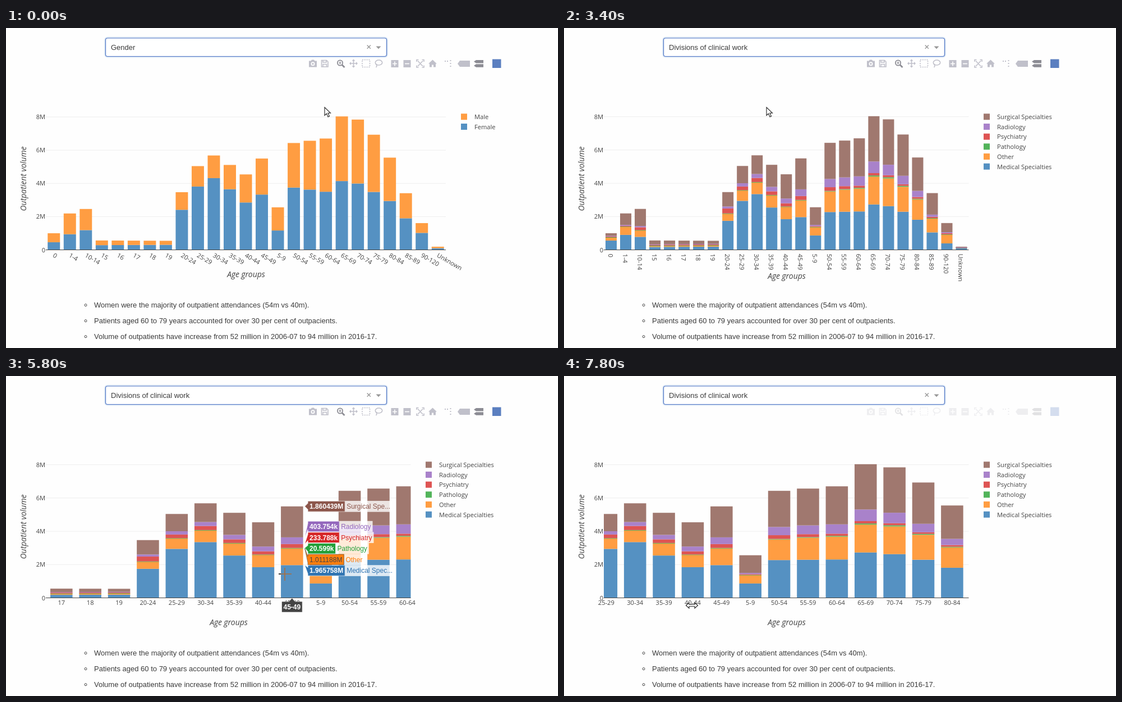
These frames come from a looping animation (984x569 px, 8 s). An HTML page:

```html
<!DOCTYPE html>
<html lang="en">
<head>
<meta charset="utf-8">
<title>Outpatient volume</title>
<style>
html, body { margin: 0; width: 100%; height: 100%; overflow: hidden; background: #fefefe; }
svg { display: block; width: 100%; height: 100%; }
text { font: 13px "Liberation Sans", Arial, sans-serif; fill: #3b3b3b; white-space: pre; }
.plot { font: 11.1px "Open Sans", sans-serif; fill: #444; }
.title { font: italic 14px "Open Sans", sans-serif; fill: #444; }
.tip { font-size: 12px; }
.bold { font-weight: bold; }
.end { text-anchor: end; }
.mid { text-anchor: middle; }
.cross { mix-blend-mode: difference; }
</style>
</head>
<body>
<svg id="stage" viewBox="0 0 984 569"></svg>
<script>
const stage = document.getElementById('stage');
const LOOP = 8000, STEP = 200, ZERO = 394.5, LEFT = 71, TOP = 144, BAR = 0.77, ZOOM_STEP = 51.38;

// Linear interpolation between key points [position, value, ...]
function at(keys, t) {
  const n = keys.findIndex(k => k[0] > t);
  if (n === 0) return keys[0].slice(1);
  if (n < 0) return keys[keys.length - 1].slice(1);
  const a = keys[n - 1], b = keys[n], p = (t - a[0]) / (b[0] - a[0]);
  return a.slice(1).map((v, i) => v + (b[i + 1] - v) * p);
}

const span = (from, to, width) => Array.from({ length: (to - from) / width + 1 },
  (_, i) => width === 1 ? `${from + i}` : `${from + i * width}-${from + i * width + width - 1}`);
const ages = ['0', '1-4', '10-14', ...span(15, 19, 1), ...span(20, 45, 5), '5-9', ...span(50, 85, 5), '90-120', 'Unknown'];

function midAge(label) {
  if (label === 'Unknown') return 120;
  const ends = label.split('-').map(Number);
  return (ends[0] + ends[ends.length - 1]) / 2;
}

// Volume in thousands along age; single years hold a fifth of a normal group
const volume = [[0, 1000], [2.5, 2190], [7, 2560], [12, 2460], [15, 565], [19, 545], [22, 3470], [27, 5040],
  [32, 5680], [42, 4540], [47, 5495], [52, 6430], [62, 6700], [67, 8030], [72, 7840], [77, 6930], [82, 5550],
  [87, 3410], [105, 1610], [120, 190]];

// Each trace takes a share of the volume along age; the last one takes what is left
const trace = (name, fill, strong, share) => ({ name, fill, strong, share });
function makeChart(layout, traces) {
  const stacks = ages.map(label => {
    const age = midAge(label), sum = at(volume, age)[0];
    let left = sum;
    return traces.map(({ share }) => {
      const part = share ? sum * at(share, age)[0] : left;
      left -= part;
      return part;
    });
  });
  return { ...layout, traces, stacks };
}

const BLUE = '#5591c2', ORANGE = '#ff9d42';
const gender = makeChart({ right: 784, scale: 0.02955, legendX: 811, textX: 835, titleX: 428 }, [
  trace('Female', BLUE, BLUE, [[0, .46], [2.5, .43], [15, .5], [19, .56], [22, .695], [27, .756], [32, .76],
    [37, .714], [42, .628], [52, .583], [62, .522], [77, .503], [87, .557], [105, .634], [120, .53]]),
  trace('Male', ORANGE, ORANGE)
]);
const divisions = makeChart({ right: 721.5, scale: 0.0296, legendX: 748, textX: 772, titleX: 397 }, [
  trace('Medical Specialties', BLUE, '#2f74b2', [[0, .56], [2.5, .411], [7, .338], [15, .305], [19, .352], [22, .503],
    [27, .584], [32, .59], [42, .406], [47, .358], [82, .326], [105, .242], [120, .63]]),
  trace('Other', ORANGE, '#ff7f0e', [[0, .2], [2.5, .233], [15, .143], [19, .166], [22, .127], [32, .125],
    [47, .184], [57, .201], [82, .22], [105, .335], [120, .08]]),
  trace('Pathology', '#52b45a', '#23a03a', [[0, .001], [22, .0015], [47, .0037], [70, .009], [105, .004]]),
  trace('Psychiatry', '#de5453', '#d62728', [[0, .05], [2.5, .011], [7, .018], [16, .108], [19, .108], [27, .043],
    [47, .0425], [62, .0194], [77, .014], [105, .04]]),
  trace('Radiology', '#a982ca', '#9467bd', [[0, .024], [32, .042], [47, .0735], [67, .087], [82, .0667], [87, .038]]),
  trace('Surgical Specialties', '#a0786f', '#8c564b')
]);

// Exact readings for the groups the pointer rests on, bottom trace first
const readings = {
  '16': '175.92k 82.164k 435 61.04k 13.883k 230.504k',
  '45-49': '1.965758M 1.011188M 20.599k 233.788k 403.754k 1.860439M'
};
const short = v => v >= 1000 ? (v / 1000).toFixed(3) + 'M' : v >= 1 ? v.toFixed(2) + 'k' : Math.round(v * 1000);

const pointer = [[0, 568, 141], [400, 556, 115], [1200, 462, 36], [2000, 430, 32], [2600, 404, 91], [3200, 397, 102],
  [3600, 325, 180], [4200, 199, 313], [4400, 225, 312], [4800, 463, 312], [5000, 552, 312], [5800, 497, 352],
  [6400, 446, 399], [7000, 337, 399], [7600, 228, 408]];
const modebarFade = [[800, 1], [1200, 0], [2800, 0], [3000, 1], [4000, 1], [4400, 0], [5000, 0], [5400, 1],
  [6400, 1], [6800, 0], [7600, 0], [8400, 1]];
const pan = [[6400, 0], [7000, -98], [7600, -229]];

const rect = (x, y, w, h, fill, extra = '') =>
  `<rect x="${x}" y="${y}" width="${w}" height="${h}" fill="${fill}" ${extra}/>`;
const path = (d, fill, stroke = 'none', width = 1) =>
  `<path d="${d}" fill="${fill}" stroke="${stroke}" stroke-width="${width}"/>`;
const text = (x, y, s, cls = '', extra = '') => `<text x="${x}" y="${y}" class="${cls}" ${extra}>${s}</text>`;

const ruler = document.createElement('canvas').getContext('2d');
function widthOf(s, weight = '') {
  ruler.font = weight + ' 12px "Liberation Sans", Arial, sans-serif';
  return ruler.measureText(s).width;
}

function axis(chart, t) {
  if (t >= 5200) return { first: 98.8 - 5 * ZOOM_STEP + at(pan, t)[0], step: ZOOM_STEP, angle: 0 };
  const step = (chart.right - LEFT) / ages.length;
  return { first: LEFT + step / 2, step, angle: chart === gender ? 30 : 90 };
}

function drawTick(cx, label, angle) {
  if (!angle) return text(cx, 407, label, 'plot mid');
  const x = cx - angle / 60, y = angle === 90 ? 401.5 : 403;
  return text(x, y + 4, label, 'plot', `transform="rotate(${angle} ${x} ${y})"`);
}

function drawChart(chart, ax) {
  const { right, scale } = chart, width = right - LEFT, barWidth = ax.step * BAR;
  let grid = '', bars = '', ticks = '';
  for (let m = 0; m <= 8; m += 2) {
    const y = ZERO - m * 1000 * scale;
    if (m) grid += rect(LEFT, y - .5, width, 1, '#eee');
    ticks += text(70, y + 4, m ? m + 'M' : 0, 'plot end');
  }
  ages.forEach((age, i) => {
    const cx = ax.first + i * ax.step;
    let y = ZERO;
    chart.traces.forEach(({ fill }, n) => {
      const h = chart.stacks[i][n] * scale;
      y -= h;
      bars += rect(cx - barWidth / 2, y, barWidth, Math.max(h, 1), fill);
    });
    if (cx >= LEFT && cx <= right) ticks += drawTick(cx, age, ax.angle);
  });
  const legend = [...chart.traces].reverse().map(({ name, fill }, i) =>
    rect(chart.legendX, 152.3 + i * 17.7, 11, 11, fill) +
    text(chart.textX, 162 + i * 17.7, name, 'plot')).join('');
  return grid + `<clipPath id="area">${rect(LEFT, TOP, width, 251, '#000')}</clipPath>` +
    `<g clip-path="url(#area)">${bars}</g>` + rect(LEFT, 394, width, 1, '#444') + ticks + legend +
    text(chart.titleX, ax.angle === 90 ? 446 : 443.3, 'Age groups', 'title mid') +
    text(0, 0, 'Outpatient volume', 'title mid', 'transform="translate(36 268) rotate(-90)"');
}

// Moves labels apart by the least amount, keeping them above the axis
function spread(positions, gap) {
  const blocks = [];
  positions.forEach((p, i) => {
    let block = { sum: p - i * gap, count: 1 };
    while (blocks.length) {
      const last = blocks[blocks.length - 1];
      if (last.sum / last.count <= block.sum / block.count) break;
      blocks.pop();
      block = { sum: last.sum + block.sum, count: last.count + block.count };
    }
    blocks.push(block);
  });
  return blocks.flatMap(b => Array(b.count).fill(b.sum / b.count))
    .map((base, i) => Math.min(base + i * gap, 385 - (positions.length - 1 - i) * gap));
}

function drawHover({ traces, stacks, scale }, ax, i) {
  const cx = ax.first + i * ax.step, tipX = cx + ax.step * BAR / 2 + 3, x = tipX + 5.5;
  const values = readings[ages[i]] ? readings[ages[i]].split(' ') : stacks[i].map(short);
  let y = ZERO;
  const tops = stacks[i].map(v => y -= v * scale).reverse();
  const centres = spread(tops, 19.6);
  let out = '';
  traces.forEach((tr, n) => {
    const row = traces.length - 1 - n, c = centres[row], dark = tr.name === 'Other', value = values[n];
    const name = tr.name.length > 15 ? tr.name.slice(0, 12) + '...' : tr.name;
    const w = widthOf(value, dark ? '' : 'bold') + 6, ink = dark ? '#444' : '#fff';
    out = rect(x + w, c - 9.8, widthOf(name) + 6, 19.6, '#fff', 'opacity=".8"') +
      path(`M${tipX},${tops[row]}L${x},${c + 5.5}V${c + 9.3}h${w}v-18.6H${x}V${c - 5.5}Z`, tr.strong, ink, .6) +
      text(x + 3, c + 4.3, value, dark ? 'tip' : 'tip bold', `style="fill:${ink}"`) +
      text(x + w + 3, c + 4.3, name, 'tip', `style="fill:${tr.strong}"`) + out;
  });
  const half = widthOf(ages[i], 'bold') / 2 + 3;
  return out + path(`M${cx},395l5.5,6H${cx + half}v19H${cx - half}v-19H${cx - 5.5}Z`, '#444', '#fff', .6) +
    text(cx, 415, ages[i], 'tip bold mid', 'style="fill:#fff"');
}

function drawBrush(right, x) {
  const start = 199.5;
  const handle = hx => rect(hx, 293, 3.5, 38, '#fff', 'stroke="#444"');
  return rect(LEFT, TOP, start - LEFT, 250, '#000', 'opacity=".4"') +
    rect(x, TOP, right - x, 250, '#000', 'opacity=".4"') + handle(start - 3.5) + handle(x);
}

function drawModebar(opacity) {
  const soft = '#c0c0ca', hard = '#8c8c94', paper = '#fefefe';
  const line = (d, color = soft, width = 1.6) => path(d, 'none', color, width);
  const tag = (x, y, w, h, color) => path(`M${x},${y}l4,${-h / 2}h${w - 4}v${h}h${4 - w}Z`, color);
  const ring = (cx, cy, r, fill, stroke) =>
    `<circle cx="${cx}" cy="${cy}" r="${r}" fill="${fill}" stroke="${stroke}" stroke-width="1.8"/>`;
  const camera = path('M540,58.5h3.5l1.5-2h4l1.5,2h3.5v11h-14Z', soft) + ring(547, 63.8, 2.6, soft, paper);
  const disk = line('M562.5,57.5h9l2.5,2.5v9h-11.5ZM565,57v4h6v-4M565,69v-4.5h6.5v4.5');
  const lens = ring(595.5, 62, 4.6, 'none', hard) + line('M599,65.5l4.5,4.5', hard, 2.6) +
    line('M593,62h5M595.5,59.5v5', hard, 1.2);
  const move = line('M613,63h13M619.5,56.5v13') +
    path('M612,63l3-3v6ZM627,63l-3-3v6ZM619.5,55.5l3,3h-6ZM619.5,70.5l3-3h-6Z', soft);
  const box = rect(635, 56.5, 13.5, 13, 'none', `stroke="${soft}" stroke-width="1.6" stroke-dasharray="2 1.8"`);
  const lasso = `<ellipse cx="664.5" cy="61.5" rx="6.2" ry="4.5" fill="none" stroke="${soft}" stroke-width="1.6"/>` +
    line('M659.5,64.5q3,2 0,5.5');
  const zoom = rect(686.5, 57, 13, 13, soft) + line('M689,63.5h8M693,59.5v8', paper) +
    rect(708.5, 57, 13, 13, soft) + line('M711,63.5h8', paper);
  const fit = line('M732,60v-3.5h3.5M741.5,56.5h3.5v3.5M745,66.5v3.5h-3.5M735.5,70h-3.5v-3.5M734,58.5l9,9.5M743,58.5l-9,9.5');
  const home = path('M753,63.5l7.5-7 7.5,7h-2v6h-4v-4h-3v4h-4v-6Z', soft);
  const spikes = rect(782, 58, 2, 2, soft) + rect(786, 58, 2, 2, soft) +
    [57, 62, 67].map(y => rect(791.5, y, 2, 2, soft)).join('');
  return `<g opacity="${opacity}">` + camera + disk + lens + move + box + lasso + zoom + fit + home + spikes +
    tag(805, 63.5, 22, 11, soft) + tag(834, 59.7, 17, 5.5, hard) + tag(834, 67, 17, 5.5, hard) +
    rect(867, 55.5, 15.5, 15.5, '#5b7fc0') + '</g>';
}

function drawDropdown(label, open) {
  const frame = open
    ? path('M177.5,117V21q0-3,3-3h495q3,0,3,3V50.5h1V114q0,3-3,3H180.5q-3,0-3-3', '#fff', '#c8c8cc') +
      rect(178, 84, 501, 32.5, '#ebf1fc') + rect(178, 50, 501, 1, '#e2e2e4') +
      text(182, 72.5, 'Gender', 'bold') + text(182, 105, 'Divisions of clinical work')
    : rect(176, 16.5, 504, 35.5, 'none', 'rx="5" stroke="#dfeaf6" stroke-width="2"') +
      rect(177.5, 18, 501, 32.5, '#fff', 'rx="3.5" stroke="#4b72c4" stroke-width="1.2"');
  return frame + text(187, 39, label) + path('M643.7,30.5l6.2,6.2M649.9,30.5l-6.2,6.2', 'none', '#999', 1.4) +
    path(open ? 'M659.5,37.2h9l-4.5-4.7Z' : 'M659.5,32.5h9l-4.5,4.7Z', '#999');
}

function drawPointer(x, y, t) {
  if (t >= 3600 && t < 6400)
    return path(`M${x - 11},${y}h23M${x},${y - 11}v23`, 'none', '#fff', 1.6).replace('<path', '<path class="cross"');
  if (t >= 6400)
    return path(`M${x - 10.5},${y}l5.5-5v3.2h10v-3.2l5.5,5-5.5,5v-3.2h-10v3.2Z`, '#fff', '#222', 1.1);
  return path(`M${x},${y}v14.5l3.4-3.2 2.6,5.8 2.5-1.1-2.6-5.7h4.6Z`, '#fff', '#222', 1.1);
}

const notes = [
  'Women were the majority of outpatient attendances (54m vs 40m).',
  'Patients aged 60 to 79 years accounted for over 30 per cent of outpacients.',
  'Volume of outpatients have increase from 52 million in 2006-07 to 94 million in 2016-17.'
].map((s, i) => `<circle cx="142" cy="${492.7 + i * 28}" r="2" fill="none" stroke="#444"/>` +
  text(157, 496.5 + i * 28, s)).join('');

function render(t) {
  const chart = t < 3000 ? gender : divisions, ax = axis(chart, t), [x, y] = at(pointer, t);
  const hovering = (t >= 3600 && t <= 4200) || (t >= 5600 && t <= 6000);
  stage.innerHTML = notes + drawChart(chart, ax) +
    (t >= 4400 && t < 5200 ? drawBrush(chart.right, Math.max(x - 24, 215)) : '') +
    drawModebar(at(modebarFade, t)[0]) +
    (hovering ? drawHover(chart, ax, Math.round((x - ax.first) / ax.step)) : '') +
    drawDropdown(chart === gender ? 'Gender' : 'Divisions of clinical work', t >= 2000 && t < 3000) +
    drawPointer(x, y, t);
}

let shown = -1;
function tick() {
  const t = Math.floor(performance.now() % LOOP / STEP) * STEP;
  if (t !== shown) render(shown = t);
  requestAnimationFrame(tick);
}
tick();
</script>
</body>
</html>
```
